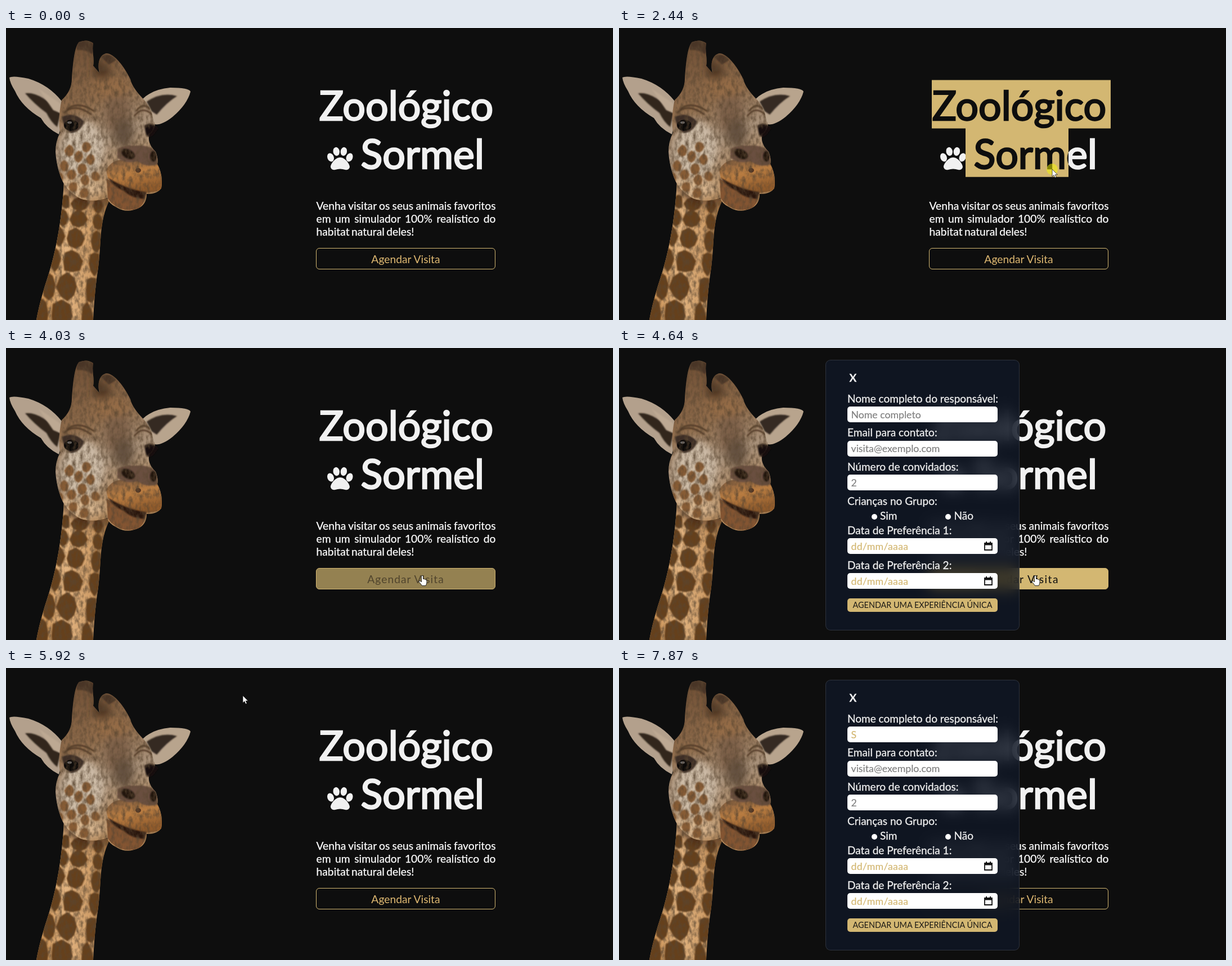
An HTML page for the animation above (8000 ms loop, 1079 px wide and 519 px high).

```html
<!DOCTYPE html>
<html lang="pt-BR">
<head>
<meta charset="utf-8">
<title>Zoológico</title>
<style>
  html, body { margin: 0; width: 100%; height: 100%; overflow: hidden; background: #0e0e0e; }
  body, svg.stage, .layer { position: absolute; left: 0; top: 0; width: 1079px; height: 519px; }
  body { font: 19.3px/23.2px Lato, sans-serif; color: #fff; cursor: none; }
  .layer > *, .at { position: absolute; white-space: pre; }
  .title { font-size: 71.8px; line-height: 86.2px; color: #f1f1f1; -webkit-text-stroke: 2.5px currentColor; }
  .first { left: 552px; width: 319px; top: 93px; text-align: center; }
  .second { left: 630.4px; top: 179.2px; }
  .para { left: 551.5px; width: 319px; top: 303.5px; -webkit-text-stroke: .25px currentColor; }
  .para div { white-space: nowrap; word-spacing: -1.5px; text-align-last: justify; }
  .para div:last-child { text-align-last: left; }
  #picked { background: #d3b772; visibility: hidden; }
  #picked > * { color: #0e0e0e; }
  #book { left: 551px; top: 391px; width: 317px; height: 36px; border: 1px solid #d3b772; border-radius: 6px;
    line-height: 37px; text-align: center; color: #deb871; }
  #modal { visibility: hidden; color: #f0f0f0; }
  #panel { left: 367px; top: 21px; width: 343px; height: 479px; border: 1px solid rgba(255,255,255,.125);
    border-radius: 9px; background: rgba(17,25,40,.75); backdrop-filter: blur(13px) saturate(180%); }
  .label { font-size: 19.05px; line-height: 24px; -webkit-text-stroke: .3px currentColor; }
  .field { width: 267px; height: 28px; border-radius: 5px; background: #fff; }
  .hint { font-size: 17.7px; line-height: 24px; color: #808080; -webkit-text-stroke: .2px currentColor; }
  .gold { color: #d3b772; }
  .date { letter-spacing: .3px; }
  .radio { width: 10px; height: 10px; border-radius: 50%; background: #fff; }
  #send { left: 406px; top: 445px; width: 267px; height: 24px; border-radius: 5px; background: #d3b772;
    color: #1c1a16; font-size: 14.4px; line-height: 24.5px; text-align: center; }
  #caret { top: 109px; width: 1px; height: 19px; background: #a89a78; }
  #pointer { position: absolute; left: 0; top: 0; width: 1px; height: 1px; overflow: visible; }
  #beam { mix-blend-mode: difference; }
</style>
</head>
<body>
<svg class="stage" viewBox="0 0 1079 519">
  <defs>
    <linearGradient id="neckTone" x1="0" x2="1">
      <stop offset="0" stop-color="#c58a4c"/><stop offset=".4" stop-color="#e2b481"/>
      <stop offset=".75" stop-color="#cf9d68"/><stop offset="1" stop-color="#93683b"/>
    </linearGradient>
    <linearGradient id="faceTone" x1=".3" y1="0" x2=".55" y2="1">
      <stop offset="0" stop-color="#6f4f35"/><stop offset=".35" stop-color="#8f6c4c"/>
      <stop offset=".58" stop-color="#a8917a"/><stop offset="1" stop-color="#b98a58"/>
    </linearGradient>
    <linearGradient id="muzzleTone" x1="0" x2=".4" y2="1">
      <stop offset="0" stop-color="#7b5a40"/><stop offset=".5" stop-color="#b97d42"/><stop offset="1" stop-color="#925c2c"/>
    </linearGradient>
    <filter id="soft" x="-50%" y="-50%" width="200%" height="200%"><feGaussianBlur stdDeviation="7"/></filter>
    <filter id="fine" x="-20%" y="-20%" width="140%" height="140%"><feGaussianBlur stdDeviation="1.3"/></filter>
    <filter id="fur" x="0" y="0" width="100%" height="100%">
      <feTurbulence type="fractalNoise" baseFrequency=".16 .09" numOctaves="3" seed="4"/>
      <feColorMatrix values="0 0 0 0 .1  0 0 0 0 .06  0 0 0 0 .03  1.6 0 0 0 -.6"/>
      <feComposite operator="in" in2="SourceGraphic"/>
    </filter>
    <clipPath id="neckClip"><path id="neck" d="M103 272C100 340 88 400 75 440Q60 485 54 519H155Q157 470 164 425C170 380 165 345 184 306L150 285Z"/></clipPath>
    <clipPath id="faceClip"><path id="face" d="M99 128Q117 112 117 90C119 62 122 32 130 25Q144 19 155 27C152 42 158 55 155 67L166 80C162 62 166 48 178 45C193 45 211 70 221 91Q224 105 242 124Q260 142 262 165Q270 175 255 190Q250 204 266 220Q271 232 269 242Q280 262 276 285Q268 296 250 295Q250 313 236 320Q214 330 197 319Q182 312 180 302Q154 311 132 303Q110 291 101 273Q90 250 88 220Q88 202 96 186Q92 158 99 128Z"/></clipPath>
  </defs>
  <use href="#neck" fill="url(#neckTone)"/>
  <g clip-path="url(#neckClip)">
    <path id="neckSpots" filter="url(#fine)" fill="#653f1e"/>
    <path d="M100 290Q140 335 190 308L190 285L100 270Z" fill="#3a2412" opacity=".5" filter="url(#soft)"/>
  </g>
  <path d="M6 88Q12 84 40 90Q76 101 99 130L101 165L94 189Q72 178 62 160Q28 140 16 112Q7 98 6 88Z" fill="#b3a08c"/>
  <path d="M34 116Q60 112 97 151L91 176Q79 166 72 151Q50 135 34 116Z" fill="#30251d" filter="url(#fine)"/>
  <path d="M58 108L96 134L98 152L84 146Z" fill="#bda993" filter="url(#fine)"/>
  <path d="M243 126Q260 109 292 106Q325 106 328 113Q322 136 296 158Q276 174 263 171Z" fill="#b8a48d"/>
  <path d="M250 131Q276 113 304 121Q286 132 268 154L259 148Z" fill="#352a21" filter="url(#fine)"/>
  <use href="#face" fill="url(#faceTone)"/>
  <g clip-path="url(#faceClip)">
    <g filter="url(#soft)">
      <ellipse cx="136" cy="216" rx="38" ry="52" fill="#cdbca7"/>
      <ellipse cx="128" cy="283" rx="48" ry="18" fill="#d8b68f"/>
      <ellipse cx="198" cy="150" rx="22" ry="42" fill="#7d6048"/>
      <ellipse cx="209" cy="186" rx="18" ry="27" fill="#65513f"/>
      <ellipse cx="185" cy="104" rx="34" ry="19" fill="#946c46"/>
      <path d="M158 50L188 75L182 92L155 88Z" fill="#4d3423"/>
    </g>
    <path d="M126 25Q144 17 159 30L153 47Q142 37 126 39Z M168 51Q183 41 196 57L183 65Z" fill="#4a3426" filter="url(#fine)"/>
    <path id="faceSpots" filter="url(#fine)" fill="#875b34"/>
    <path d="M178 252Q190 232 211 235L267 235Q281 266 276 288Q250 296 228 290Q202 283 181 267Z" fill="url(#muzzleTone)"/>
    <path d="M179 268Q203 283 247 300Q247 312 234 322Q199 329 181 303Z" fill="#845532"/>
    <path d="M181 266Q212 286 250 292L246 304Q222 302 209 289Q192 283 181 266Z" fill="#2a1810" filter="url(#fine)"/>
    <path d="M198 216Q208 207 231 209Q251 207 264 217L270 242Q250 249 234 237Q210 242 198 230Z" fill="#6b4f40" filter="url(#fine)"/>
    <ellipse cx="217" cy="224" rx="13" ry="8" fill="#20140f" transform="rotate(28 217 224)" filter="url(#fine)"/>
    <ellipse cx="262" cy="228" rx="6" ry="10" fill="#20140f" filter="url(#fine)"/>
    <ellipse cx="235" cy="253" rx="5" ry="4" fill="#543421"/>
    <path d="M99 158Q121 147 139 166Q135 182 117 187Q104 184 99 158Z" fill="#3c2e25" filter="url(#fine)"/>
    <ellipse cx="116" cy="173" rx="13" ry="10" fill="#0c0a09"/>
    <ellipse cx="113" cy="168" rx="4" ry="2" fill="#6b6a6c"/>
    <path d="M103 151Q123 132 152 154M108 145Q128 128 157 148M228 157Q242 137 260 154M231 148Q243 131 256 144" fill="none" stroke="#4d3624" stroke-width="2.5" filter="url(#fine)"/>
  </g>
  <path d="M246 174Q258 165 271 178L262 190Q255 197 249 190Z" fill="#18110d" filter="url(#fine)"/>
  <g filter="url(#fur)"><use href="#face"/><use href="#neck"/></g>
  <g id="paw" fill="#f1f1f1">
    <path d="M594 230C602 230 611 241 611 247Q610 253 603 252Q594 249 585 252Q578 253 577 247C577 241 586 230 594 230Z"/>
  </g>
</svg>

<div class="layer" id="hero">
  <div class="title first">Zoológico</div>
  <div class="title second">Sormel</div>
  <div class="para"><div>Venha visitar os seus animais favoritos</div><div>em um simulador 100% realístico do</div><div>habitat natural deles!</div></div>
</div>
<div class="at" id="book">Agendar Visita</div>
<div class="layer" id="modal">
  <div id="panel"></div>
  <div id="send">AGENDAR UMA EXPERIÊNCIA ÚNICA</div>
  <div id="caret"></div>
</div>

<svg id="pointer">
  <circle id="halo" r="10" fill="#fafa00" fill-opacity=".5"/>
  <path id="arrow" d="M0 0V13L3 10.3L5 15L7.2 14L5.2 9.6H9.3Z" fill="#fff" stroke="#111" stroke-width=".7"/>
  <path id="beam" d="M-2.5 -5.5H-.5L0 -5L.5 -5.5H2.5M0 -5V5M-2.5 5.5H-.5L0 5L.5 5.5H2.5" fill="none" stroke="#fff" stroke-width="1.2"/>
  <path id="hand" d="M-1.6 1Q-1.4 -.6 0 -.6Q1.5 -.6 1.6 1V5.5Q4 4.8 4.3 6.3Q6 5.6 6.5 7.2Q8 7 8 9V12Q7.5 15 6 17.5H-.5Q-2 15 -6 10.5Q-6 8 -3.5 9L-1.6 11Z" fill="#fff" stroke="#111" stroke-width=".9"/>
</svg>

<script>
const LOOP = 8000;
const $ = id => document.getElementById(id);
const clamp = p => Math.min(1, Math.max(0, p));
const smooth = p => p * p * (3 - 2 * p);

// Giraffe coat: seeded irregular patches
let seed = 7;
const random = () => (seed = seed * 16807 % 2147483647) / 2147483647;
function patch(cx, cy, rx, ry) {
  const points = Array.from({ length: 8 }, (_, i) => {
    const a = i * Math.PI / 4, k = .85 + random() * .3;
    return [cx + Math.cos(a) * rx * k, cy + Math.sin(a) * ry * k];
  });
  return `M${points.join('L')}Z`;
}
function neckCoat() {
  let path = '';
  for (let row = 0, y = 308; row < 6; row++, y += 22 + row * 6) {
    const down = (y - 280) / 239, left = 104 - 50 * down ** 1.3, width = 68 + 33 * down;
    for (const column of [.06, .42, .88])
      path += patch(left + width * column, y + column * 10, width * (column === .42 ? .21 : .12), 13 + row * 3);
  }
  return path;
}
function cheekCoat(count) {
  let path = '';
  for (let i = 0; i < count; i++) {
    const a = i * 2.4, r = Math.sqrt((i + .5) / count);
    path += patch(127 + Math.cos(a) * r * 40, 250 + Math.sin(a) * r * 46, 8, 10);
  }
  return path;
}
$('neckSpots').setAttribute('d', neckCoat());
$('faceSpots').setAttribute('d', cheekCoat(12));

for (const side of [-1, 1])
  for (const [dx, y, tilt] of [[6.6, 219.5, 10], [16.8, 230, 22]])
    $('paw').insertAdjacentHTML('beforeend',
      `<ellipse rx="5.7" ry="7.7" transform="translate(${593.8 + side * dx} ${y}) rotate(${side * tilt})"/>`);

// Booking form
const add = (cls, x, y, text = '') => {
  $('modal').insertAdjacentHTML('beforeend', `<div class="${cls}" style="left:${x}px;top:${y}px">${text}</div>`);
  return $('modal').lastElementChild;
};
const label = (x, middle, text) => add('label', x, middle - 12, text);
function entry(middle, title, hint, cls = '') {
  label(406, middle, title);
  add('field', 406, middle + 14.5);
  return add('hint ' + cls, 412.5, middle + 17, hint);
}
const calendar = '<svg width="15" height="17" style="display:block"><path d="M1 3H14V15H1Z" fill="none" stroke="#111" stroke-width="1.8"/><path d="M1 2.5H14V6.5H1ZM3 0H5V3H3ZM10 0H12V3H10Z" fill="#111"/></svg>';

label(409.5, 52.5, '<b>X</b>');
const [nameHint] = [
  ['Nome completo do responsável:', 'Nome completo'],
  ['Email para contato:', 'visita@exemplo.com'],
  ['Número de convidados:', '2']
].map(([title, hint], i) => entry(89.5 + 60.7 * i, title, hint));
label(406, 271.5, 'Crianças no Grupo:');
['Sim', 'Não'].forEach((text, i) => {
  add('radio', 449 + 131 * i, 295);
  label(464 + 131.5 * i, 298, text);
});
for (const i of [0, 1]) {
  const middle = 323.5 + 62 * i;
  entry(middle, `Data de Preferência ${i + 1}:`, 'dd/mm/aaaa', 'gold date');
  add('icon', 649, middle + 20, calendar);
}

// Selected text is a recoloured copy of the hero, clipped to the marked lines
const picked = $('hero').cloneNode(true);
picked.id = 'picked';
$('hero').after(picked);

const pen = document.createElement('canvas').getContext('2d');
pen.font = '71.8px Lato, sans-serif';
function snap(text, left, x) {
  const edges = [...text, ''].map((_, i) => left + pen.measureText(text.slice(0, i)).width);
  return edges.reduce((a, b) => Math.abs(b - x) < Math.abs(a - x) ? b : a);
}
function selection([x, y]) {
  const box = (x0, y0, x1, y1) => `M${x0} ${y0}H${x1}V${y1}H${x0}Z`;
  if (y < 178.5) return box(556, 92.5, snap('Zoológico', 556, x), 178.5);
  let path = box(556, 92.5, 874, 178.5);
  path += box(616, 178.5, y < 300 ? snap(' Sormel', 616, x) : 858, 264.7);
  for (let top = 304; top < y; top += 23.2)
    path += box(551.5, top, y > top + 23.2 ? 870 : Math.min(x, 870), top + 23.2);
  return path;
}

// Pointer moves: start, end, destination; it rests in between
const ENTRY = [1006, 455];
const MOVES = [
  [70, 560, 553, 157], [640, 1580, 761, 279], [1640, 2080, 855, 338], [2120, 2650, 725, 205],
  [2750, 3180, 716, 310], [3300, 3800, 740, 405], [4840, 4940, 735, 430], [4940, 5290, 427, 48],
  [5380, 5560, 421, 49], [6130, 6920, 665, 400], [7120, 7430, 533, 119]
];
const PRESSES = [[560, 2600], [3130, 3290], [4490, 4640], [5650, 5790], [6900, 7080], [7480, 7600]];
const HOVERS = [[3710, 5040], [6860, 7080]];
const MODAL = [[4640, 5790], [7080, LOOP]];
const FADE = 800, LAG = 100;

const within = (spans, t) => spans.some(([a, b]) => t >= a && t < b);
const pointerAt = t => MOVES.reduce(([px, py], [from, to, x, y]) => {
  const p = smooth(clamp((t - from) / (to - from)));
  return [px + (x - px) * p, py + (y - py) * p];
}, ENTRY);

function shapeAt(t) {
  const [x, y] = pointerAt(t);
  const over = (x0, y0, x1, y1) => x > x0 && x < x1 && y > y0 && y < y1;
  if (within(MODAL, t) && over(367, 21, 712, 502))
    return over(408, 42, 425, 62) ? 'hand' : over(406, 104, 673, 132) ? 'beam' : 'arrow';
  if (over(551, 391, 870, 429)) return 'hand';
  return over(550, 92, 870, 265) || over(550, 303, 870, 373) ? 'beam' : 'arrow';
}

// CSS "ease" as a function of progress
function ease(p) {
  let low = 0, high = 1;
  for (let i = 0; i < 20; i++) {
    const s = (low + high) / 2;
    if (.75 * s * (1 - s) + s ** 3 < p) low = s; else high = s;
  }
  return .3 * low * (1 - low) ** 2 + 3 * low * low * (1 - low) + low ** 3;
}
const fade = (from, t) => ease(clamp((t - from) / FADE));
const hoverAt = t => HOVERS.reduce((sum, [from, to]) =>
  sum + fade(from, Math.min(t, to)) * (1 - fade(to, t)), 0);

const mix = (from, to, k) => `rgb(${from.map((v, i) => v + (to[i] - v) * k)})`;
const show = (el, on) => el.style.visibility = on ? 'visible' : 'hidden';

function draw(t) {
  const [x, y] = pointerAt(t), shape = shapeAt(t - LAG);
  $('pointer').style.transform = `translate(${x}px,${y}px)`;
  for (const id of ['arrow', 'beam', 'hand']) show($(id), t >= 70 && id === shape);
  show($('halo'), within(PRESSES, t));

  const marked = t >= 850 && t < 3130;
  show(picked, marked);
  if (marked) picked.style.clipPath = `path("${selection(pointerAt(Math.min(t, 2600)))}")`;

  const k = hoverAt(t);
  Object.assign($('book').style, {
    backgroundColor: `rgba(211,183,114,${k})`,
    color: mix([222, 184, 113], [14, 14, 14], k),
    letterSpacing: `${1.5 * k}px`
  });
  show($('modal'), within(MODAL, t));

  const typed = t >= 7870;
  nameHint.textContent = typed ? 'S' : 'Nome completo';
  nameHint.classList.toggle('gold', typed);
  $('caret').style.left = typed ? '422px' : '412px';
  show($('caret'), t >= 7600);
}

let start;
function tick(now) {
  start ??= now;
  draw((now - start) % LOOP);
  requestAnimationFrame(tick);
}
draw(0);
requestAnimationFrame(tick);
</script>
</body>
</html>
```
